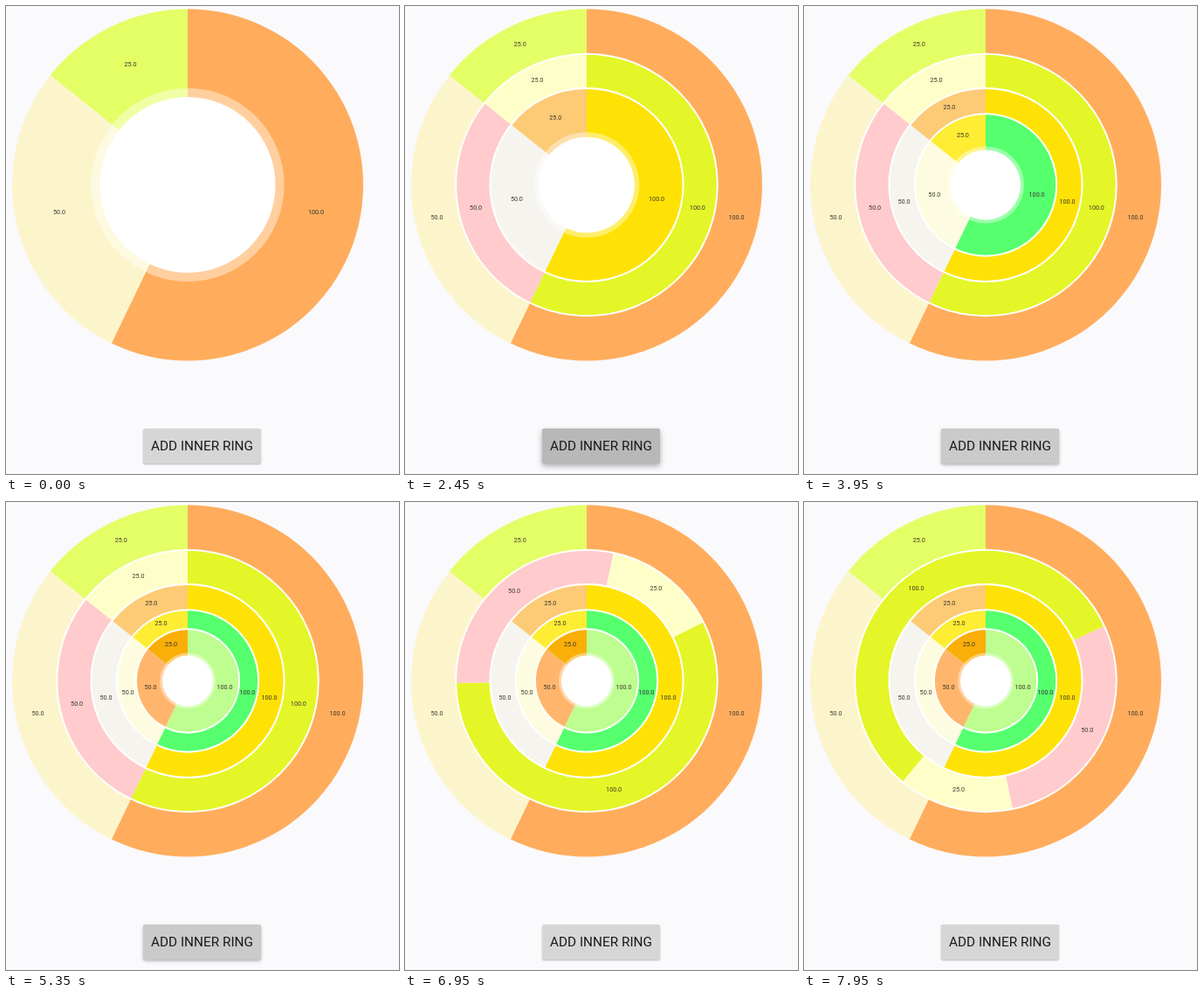
Recreate the animation shown at these times as an HTML page. Size 450x535 px, loop 8 s.

```html
<!DOCTYPE html>
<html lang="en">
<head>
<meta charset="utf-8">
<title>Nested ring chart</title>
<style>
  html, body { margin: 0; width: 100%; height: 100%; overflow: hidden; background: #faf9fc; }
  svg { position: absolute; left: 0; top: 0; }
  svg text { font: 7.2px Roboto, sans-serif; fill: #38352f; text-anchor: middle; }
  #add {
    position: absolute; left: 157px; top: 482.5px; width: 135px; height: 40px;
    border-radius: 2px; color: #1b1b1b; text-align: center; white-space: nowrap;
    font: 400 15.35px/40px Roboto, sans-serif;
  }
</style>
</head>
<body>
<svg id="chart" width="450" height="535" viewBox="0 0 450 535"></svg>
<div id="add">ADD INNER RING</div>
<script>
const LOOP = 8000, STEP = 50;
const CX = 208, CY = 204.5, RADIUS = 201, GAP = 2;
const HOLE = .5, HALO = .55, WIDE_HOLE = .75;
const FIRST_TAP = 1050, TAP_EVERY = 1400;
const VALUES = [100, 50, 25];
const TOTAL = VALUES.reduce((a, b) => a + b);

const COLOURS = [
  ['#ffad5c', '#fcf5cc', '#e4fe66'],
  ['#e4f628', '#ffcbcd', '#feffc8'],
  ['#ffe205', '#f5f4ef', '#fdca75'],
  ['#55ff6e', '#fdfce0', '#feed33'],
  ['#befd90', '#ffb66c', '#f9ae08']
];

// how long the button's fade stalls after each tap
const STALLS = [0, 150, 950, 0];

// swipes that turn the second ring
const SWIPES = [
  { at: 6150, time: 700, turn: 63.3 },
  { at: 7000, time: 400, turn: 44.5 },
  { at: 7500, time: 450, turn: 111.7 }
];

const svg = document.getElementById('chart');
const button = document.getElementById('add');

const clamp = x => Math.min(1, Math.max(0, x));
const smooth = x => x * x * (3 - 2 * x);
const tapTime = i => FIRST_TAP + TAP_EVERY * i;

function add(parent, name, attrs) {
  const el = document.createElementNS('http://www.w3.org/2000/svg', name);
  for (const key in attrs) el.setAttribute(key, attrs[key]);
  return parent.appendChild(el);
}

// clockwise from the top, in degrees
function polar(r, deg) {
  const a = deg * Math.PI / 180;
  return [CX + r * Math.sin(a), CY - r * Math.cos(a)];
}

function wedge(r, from, sweep) {
  const [x0, y0] = polar(r, from), [x1, y1] = polar(r, from + sweep);
  return `M${CX} ${CY}L${x0} ${y0}A${r} ${r} 0 ${sweep > 180 ? 1 : 0} 1 ${x1} ${y1}Z`;
}

function makeRing(r, start, colours) {
  const group = add(svg, 'g', {});
  const pie = add(group, 'g', {});
  let from = 0;
  const mids = VALUES.map((v, i) => {
    const sweep = v / TOTAL * 360;
    add(pie, 'path', { d: wedge(r, from, sweep), fill: colours[i] });
    from += sweep;
    return from - sweep / 2;
  });
  const disc = (size, opacity) =>
    add(group, 'circle', { cx: CX, cy: CY, r: size, fill: '#fff', 'fill-opacity': opacity });
  const halo = disc(r * HALO, .41);
  const hole = disc(r * HOLE, 1);
  const labels = VALUES.map(v => {
    const el = add(group, 'text', {});
    el.textContent = v.toFixed(1);
    return el;
  });
  return { r, start, group, pie, halo, hole, mids, labels };
}

// each ring sits inside the widened hole of the one before
let radius = RADIUS;
const rings = COLOURS.map((colours, i) => {
  const ring = makeRing(radius, i ? tapTime(i - 1) : 0, colours);
  radius = radius * WIDE_HOLE - GAP;
  return ring;
});

function drawRing(ring, t, next, turn) {
  const shown = t >= ring.start;
  ring.group.setAttribute('display', shown ? 'inline' : 'none');
  if (!shown) return;
  const covered = next && t >= next.start;
  const inner = covered ? WIDE_HOLE : HOLE;
  ring.halo.setAttribute('display', covered ? 'none' : 'inline');
  ring.hole.setAttribute('r', ring.r * inner);
  ring.pie.setAttribute('transform', `rotate(${turn} ${CX} ${CY})`);
  ring.labels.forEach((el, i) => {
    const [x, y] = polar(ring.r * (1 + inner) / 2, ring.mids[i] + turn);
    el.setAttribute('x', x);
    el.setAttribute('y', y);
  });
}

// rises before the tap, then fades with an optional stall part way
function pressLevel(t, stall, i) {
  const age = t - tapTime(i);
  const faded = age < 100 ? age : Math.max(100, age - stall);
  return Math.min(clamp((age + 200) / 150), clamp(1 - faded / 167));
}

function drawButton(p) {
  const g = Math.round(214 - 30 * p);
  button.style.background = `rgb(${g},${g},${g + 1})`;
  button.style.boxShadow = `0 ${1 + 2 * p}px ${2 + 4 * p}px rgba(0,0,0,${.27 + .05 * p})`;
}

function draw(now) {
  const t = Math.floor(now % LOOP / STEP) * STEP;
  const turn = SWIPES.reduce((sum, s) => sum + s.turn * smooth(clamp((t - s.at) / s.time)), 0);
  rings.forEach((ring, i) => drawRing(ring, t, rings[i + 1], i === 1 ? turn : 0));
  drawButton(Math.max(...STALLS.map((stall, i) => pressLevel(t, stall, i))));
}

let origin = null;
function tick(now) {
  if (origin === null) origin = now;
  draw(now - origin);
  requestAnimationFrame(tick);
}
draw(0);
requestAnimationFrame(tick);
</script>
</body>
</html>
```
